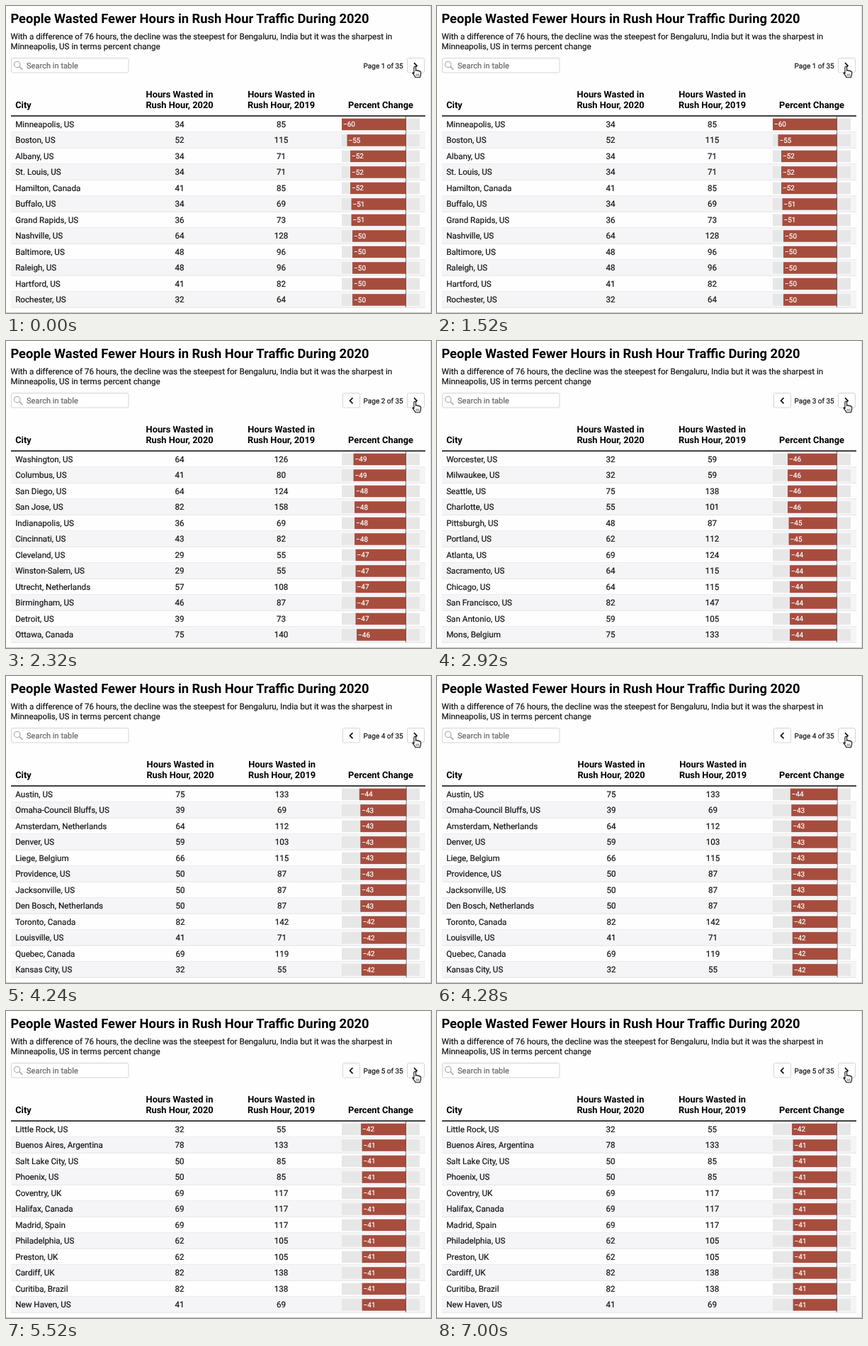
An HTML page for the animation above (7.04 s loop, 600 px wide and 433 px high).

```html
<!DOCTYPE html>
<html lang="en">
<head>
<meta charset="utf-8">
<title>Rush hour traffic table</title>
<style>
html, body { margin: 0; width: 100%; height: 100%; overflow: hidden; background: #fefefe; }
svg { display: block; width: 600px; height: 433px; overflow: hidden; }
text {
  font-family: Roboto, Arial, sans-serif; font-size: 11.667px;
  fill: #141414; stroke: #141414; stroke-width: .2px;
  text-rendering: geometricPrecision;
}
.title { font-size: 18.35px; font-weight: 700; fill: #000; stroke: none; }
.head { font-size: 12.83px; font-weight: 700; fill: #000; stroke: none; }
.mid { text-anchor: middle; }
.hint { font-size: 11.1px; fill: #666; stroke: #666; }
.page { font-size: 10px; }
.label { font-size: 10px; fill: #fff; stroke: #fff; }
.box { fill: #fff; stroke: #d4d4d4; }
.arrow { fill: none; stroke: #111; stroke-width: 1.7; }
.strip { animation: turn 7040ms step-end infinite; }
/* page turns at 1600, 2920, 4240 and 5520 ms */
@keyframes turn {
  0% { transform: translateY(0); }
  22.727% { transform: translateY(-433px); }
  41.477% { transform: translateY(-866px); }
  60.227% { transform: translateY(-1299px); }
  78.409%, 100% { transform: translateY(-1732px); }
}
</style>
</head>
<body>
<svg viewBox="0 0 600 433">
  <rect width="600" height="433" fill="#fefefe"/>
  <g class="strip" id="strip"></g>
  <text class="title" x="6.4" y="24.3">People Wasted Fewer Hours in Rush Hour Traffic During 2020</text>
  <text x="6.6" y="47.2">With a difference of 76 hours, the decline was the steepest for Bengaluru, India but it was the sharpest in</text>
  <text x="6.6" y="61.4">Minneapolis, US in terms percent change</text>
  <rect class="box" x="7.5" y="73.5" width="165.5" height="20.5" rx="2"/>
  <g fill="none" stroke="#a6a6a6" stroke-width="1.1">
    <circle cx="15.7" cy="82.4" r="4.2"/>
    <path d="M18.8 85.5L23.3 90" stroke-width="1.6"/>
  </g>
  <text class="hint" x="29" y="87.8">Search in table</text>
  <rect class="box" x="566.5" y="73.5" width="24" height="20.5" rx="2"/>
  <path class="arrow" d="M576 80.2l4 4-4 4"/>
  <g transform="translate(-1.2 -.8)" stroke="#111">
    <path d="M577.2 96.2V87.6c0-2 2.6-2 2.6 0v4.6c.3-1.3 2.4-1.1 2.5.3.5-1 2.3-.7 2.4.6.6-.8 2.1-.4 2.1 1v3.2c0 1.8-1.1 2.4-1.2 4.2h-6.6c-.2-1.7-2.2-3.2-3.4-5.4-.9-1.7.7-2.4 1.6 .1z"
      fill="#fff" stroke-width="1.1" stroke-linejoin="round"/>
    <path d="M580.4 96.4v3.2M582.3 96.4v3.2M584.2 96.4v3.2" stroke-width=".6"/>
  </g>
  <path d="M0 432.5H600" stroke="#c4c4c4"/>
  <path d="M599.5 0V433" stroke="#dedede"/>
</svg>
<script>
const pages = [
  `Minneapolis, US|34|85
Boston, US|52|115
Albany, US|34|71
St. Louis, US|34|71
Hamilton, Canada|41|85
Buffalo, US|34|69
Grand Rapids, US|36|73
Nashville, US|64|128
Baltimore, US|48|96
Raleigh, US|48|96
Hartford, US|41|82
Rochester, US|32|64`,
  `Washington, US|64|126
Columbus, US|41|80
San Diego, US|64|124
San Jose, US|82|158
Indianapolis, US|36|69
Cincinnati, US|43|82
Cleveland, US|29|55
Winston-Salem, US|29|55
Utrecht, Netherlands|57|108
Birmingham, US|46|87
Detroit, US|39|73
Ottawa, Canada|75|140`,
  `Worcester, US|32|59
Milwaukee, US|32|59
Seattle, US|75|138
Charlotte, US|55|101
Pittsburgh, US|48|87
Portland, US|62|112
Atlanta, US|69|124
Sacramento, US|64|115
Chicago, US|64|115
San Francisco, US|82|147
San Antonio, US|59|105
Mons, Belgium|75|133`,
  `Austin, US|75|133
Omaha-Council Bluffs, US|39|69
Amsterdam, Netherlands|64|112
Denver, US|59|103
Liege, Belgium|66|115
Providence, US|50|87
Jacksonville, US|50|87
Den Bosch, Netherlands|50|87
Toronto, Canada|82|142
Louisville, US|41|71
Quebec, Canada|69|119
Kansas City, US|32|55`,
  `Little Rock, US|32|55
Buenos Aires, Argentina|78|133
Salt Lake City, US|50|85
Phoenix, US|50|85
Coventry, UK|69|117
Halifax, Canada|69|117
Madrid, Spain|69|117
Philadelphia, US|62|105
Preston, UK|62|105
Cardiff, UK|82|138
Curitiba, Brazil|82|138
New Haven, US|41|69`
];
const rowH = 22.5, top0 = 155.7, unit = 1.505;

const text = (x, y, s, cls = '') => `<text class="${cls}" x="${x}" y="${y}">${s}</text>`;
const rect = (x, y, w, h, fill) => `<rect x="${x}" y="${y}" width="${w}" height="${h}" fill="${fill}"/>`;

function row(line, i, cols) {
  const [city, now, before] = line.split('|');
  const drop = Math.round((now - before) / before * 100);
  const y = top0 + i * rowH, base = y + 15.2;
  const left = cols.zero + drop * unit;
  return (i % 2 ? rect(7, y, 585, rowH, '#f5f4f6') : '') +
    rect(7, y + rowH - .9, 585, .9, '#e4e4e4') +
    text(13.2, base, city) +
    text(cols.now, base, now, 'mid') +
    text(cols.before, base, before, 'mid') +
    rect(474, y + 3, 110, 16.5, '#e7e7e7') +
    rect(left, y + 3, cols.zero - left, 16.5, '#a74d3e') +
    rect(cols.zero - .3, y, .9, rowH - .9, '#4c4c4c') +
    text(left + 2, y + 14.7, '\u2212' + -drop, 'label');
}

function page(lines, p) {
  // the longest city name pushes the columns right by a pixel
  const shift = p === 3 ? 1 : 0;
  const cols = { now: 245 + shift, before: 388.6 + shift, zero: 564.3 + shift * .7 };
  const prev = p ? '<rect class="box" x="475.5" y="73.5" width="24" height="20.5" rx="2"/>' +
    '<path class="arrow" d="M489.5 80.2l-4 4 4 4"/>' : '';
  return `<g transform="translate(0 ${p * 433})">` + prev +
    text(504.6, 87.8, `Page ${p + 1} of 35`, 'page') +
    text(13.2, 144.2, 'City', 'head') +
    text(cols.now, 129.2, 'Hours Wasted in', 'head mid') +
    text(cols.now, 144.2, 'Rush Hour, 2020', 'head mid') +
    text(cols.before, 129.2, 'Hours Wasted in', 'head mid') +
    text(cols.before, 144.2, 'Rush Hour, 2019', 'head mid') +
    text(529, 144.2, 'Percent Change', 'head mid') +
    lines.split('\n').map((line, i) => row(line, i, cols)).join('') +
    rect(7, 154.2, 585, 1.7, '#222') + '</g>';
}

document.getElementById('strip').innerHTML = pages.map(page).join('');
</script>
</body>
</html>
```
